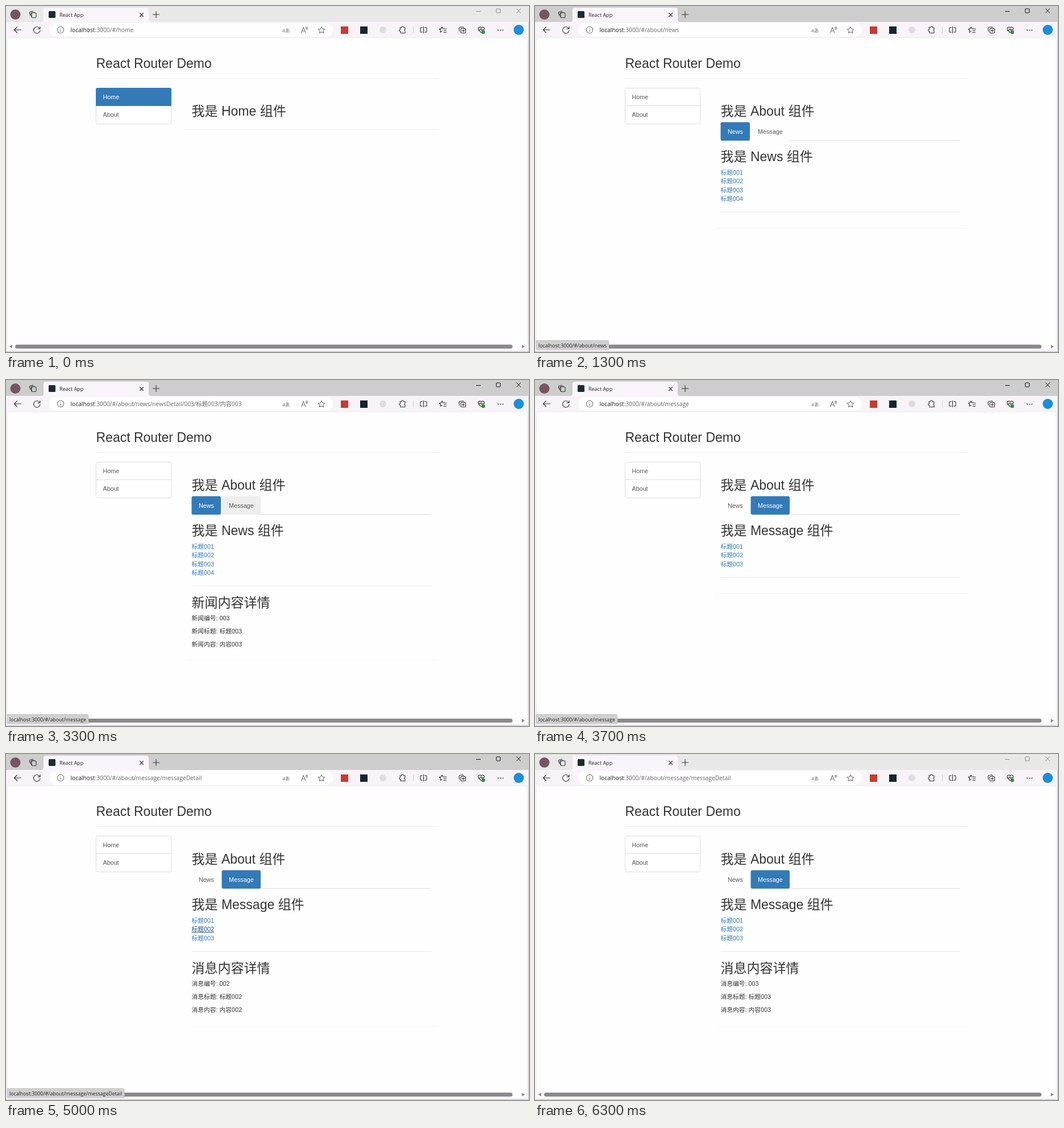
Animation of 920x609 px, one loop 6.4 s. Source, as an HTML page:

```html
<!DOCTYPE html>
<html lang="zh-CN">
<head>
<meta charset="utf-8">
<title>React App</title>
<style>
html, body { margin: 0; width: 100%; height: 100%; overflow: hidden; background: #f5f2f7; }
svg { display: block; font: 10.75px "Liberation Sans", "Noto Sans CJK SC", sans-serif; }
.ui { font-family: "Open Sans", "Noto Sans CJK SC", sans-serif; }
.line { fill: none; stroke: #333; stroke-width: 1.1; stroke-linecap: round; stroke-linejoin: round; }
.soft { stroke: #777; }
.hover { fill: #23527c; text-decoration: underline; }
</style>
</head>
<body>
<svg width="920" height="609" viewBox="0 0 920 609">
  <rect width="920" height="609" fill="#f7f3f9"/>
  <rect id="strip" width="920" height="28"/>
  <path d="M62 28q4 0 4-4V7q0-4 4-4h177q4 0 4 4v17q0 4 4 4z" fill="#f9f5fb"/>
  <circle cx="16.500" cy="15" r="9" fill="#765563"/>
  <rect x="75" y="9" width="12" height="12" rx="1.500" fill="#1c2b33"/>
  <text class="ui" x="94" y="18.500" font-size="9" fill="#222">React App</text>
  <rect x="76" y="30" width="499" height="24" rx="12" fill="#fff"/>
  <g class="line">
    <path d="M43 17l-1.500-4.500q-.5-1.500 1-2l5-1.500M45 19.500l-1-6q0-2 2-2l4-.5"/>
    <rect x="45" y="12" width="8" height="8.500" rx="1.500"/>
    <path d="M235.500 12.500l6 6m0-6l-6 6M258.500 15h11M264 9.500v11"/>
    <path d="M26.500 42h-12m5-5l-5 5 5 5"/>
    <path d="M59.500 40a5.700 5.700 0 1 0 .5 3M60 36.500v3.800h-4"/>
    <circle cx="697" cy="42" r="0"/>
    <path d="M693 38h2.500a2 2 0 0 1 4 0h2.500v3a1.700 1.700 0 0 0 0 3.200v3.300h-8v-3a1.800 1.800 0 1 1 0-3.500z"/>
    <path d="M732.500 38h-2.500q-1 0-1 1v6q0 1 1 1h2.500M736.500 38h2.500q1 0 1 1v6q0 1-1 1h-2.500M734.500 36.500v11"/>
    <path d="M767 37l1.500 3 3 .4M767 37l-1.500 3.100-3.200.4 2.400 2.300-.6 3.400 3-1.600M770 43.500h4.500M770 46.500h4.500M771 40.500h4"/>
    <path d="M797.500 44.500l-.5-5q0-1.500 1.500-2l5-.5q1.500 0 1.500 1"/>
    <rect x="800" y="39.500" width="8.500" height="8" rx="1.500"/>
    <path d="M804.300 41.500v4m-2-2h4"/>
    <path d="M836 47l-4.500-4.500q-2-3 .5-5 2.500-1.200 4 1 1.500-2.200 4-1 2.500 2 .7 4.500M831 42h3l1.500-2 1.500 3 1-1.500h3"/>
  </g>
  <g class="line soft">
    <circle cx="96" cy="42" r="5.700"/>
    <path d="M96 41.500v3.200M96 39.300v.1"/>
    <path d="M519.500 47l3.700-9.500 3.700 9.500m-6.100-3h4.800M527.500 37.500q1.500 1.500 0 3.500M529.300 36.500q2 2.500 0 5"/>
    <path d="M555 36.500l1.800 3.700 4 .6-2.900 2.800.7 4-3.600-1.900-3.600 1.900.7-4-2.900-2.800 4-.6z"/>
  </g>
  <text class="ui" x="486" y="46" font-size="8.500" fill="#666">aあ</text>
  <rect x="589" y="36" width="13" height="13" fill="#c8392f"/>
  <rect x="623" y="36" width="13" height="13" fill="#14252d"/>
  <circle cx="663" cy="42" r="6" fill="#dedce0"/>
  <path d="M716.500 36v12" stroke="#d3cfd6"/>
  <circle cx="839.500" cy="46" r="3.200" fill="#20952e"/>
  <g fill="#333"><circle cx="866" cy="42.500" r="1"/><circle cx="870" cy="42.500" r="1"/><circle cx="874" cy="42.500" r="1"/></g>
  <circle cx="902" cy="42" r="9" fill="#1b8fd9"/>
  <g id="controls" fill="none"><path d="M827 9.500h8M898 4.500l7.500 8m0-8l-7.500 8"/><rect x="862.500" y="5" width="7" height="7" rx="1"/></g>
  <rect x="2" y="56" width="915" height="550" rx="5" fill="#fefefe" stroke="#e9e5ec" stroke-width=".8"/>
  <path d="M919.500 28v581M0 608.500h920" stroke="#c4c1c7"/>
  <rect x="16" y="596" width="875" height="7" rx="3.500" fill="#8a8a8a"/>
  <path d="M11 596.300v6.400l-5-3.200zM907.500 596.300v6.400l5-3.200z" fill="#858585"/>
  <text x="158.500" y="108.500" font-size="23" fill="#333">React Router Demo</text>
  <path d="M159 127.500h601" stroke="#eee"/>
  <g id="view"></g>
  <g id="bubble"><path fill="#cfcfcf" stroke="#bdbdbd" stroke-width=".6"/><text class="ui" x="6" y="600.500" font-size="8.800" fill="#222"></text></g>
</svg>
<script>
const $ = q => document.querySelector(q);
const newsPath = n => `about/news/newsDetail/00${n}/标题00${n}/内容00${n}`;
const messagePath = 'about/message/messageDetail';

// Each step changes only the listed parts of the state.
const steps = [
  [0, {on: 0, page: 'home', url: 'home', hover: '', status: '', id: 0, fade: 1}],
  [700, {on: 1, page: 'about', url: 'about', status: 'about'}],
  [900, {hover: 'News', status: 'about/news'}],
  [1200, {page: 'news', url: 'about/news'}],
  [1600, {hover: '', status: ''}],
  [1700, {hover: '1', status: newsPath(1)}],
  [2000, {id: 1, url: newsPath(1), hover: '2', status: newsPath(2)}],
  [2300, {id: 2, url: newsPath(2)}],
  [2400, {hover: '23', status: newsPath(3)}],
  [2600, {id: 3, url: newsPath(3), hover: '3'}],
  [3000, {hover: ''}],
  [3200, {hover: 'Message', status: 'about/message'}],
  [3700, {page: 'message', url: 'about/message', id: 0}],
  [4100, {hover: '', status: ''}],
  [4200, {hover: '1', status: messagePath}],
  [4500, {id: 1, url: messagePath}],
  [4700, {hover: '12'}],
  [4800, {hover: '2'}],
  [5000, {id: 2}],
  [5100, {hover: '23'}],
  [5200, {hover: '3'}],
  [5400, {id: 3}],
  [5900, {fade: .4}],
  [6000, {status: ''}],
  [6300, {on: 0, hover: ''}]
];

const text = (x, y, str, fill = '#333', size = 10.75, cls = '') =>
  `<text x="${x}" y="${y}" fill="${fill}" font-size="${size}" class="${cls}">${str}</text>`;
const heading = (y, str) => text(326.5, y, str, '#333', 23);
const rule = (x1, x2, y, color) => `<path d="M${x1} ${y}H${x2}" stroke="${color}"/>`;
const box = (x, y, w, h, fill, r = 3) =>
  `<rect x="${x}" y="${y}" width="${w}" height="${h}" rx="${r}" fill="${fill}"/>`;
const outerRule = (y, color = '#f0f0f0') => rule(317, 760, y, color);

function sidebar(page) {
  const active = {home: 0, about: 1}[page];
  let out = '<rect x="158.500" y="144.500" width="132" height="63" rx="3" fill="#fff" stroke="#ddd"/>' +
    rule(159, 290, 175.5, '#ddd');
  if (active === 0) out += '<path d="M158 176v-29q0-3 3-3h127q3 0 3 3v29z" fill="#337ab7"/>';
  if (active === 1) out += '<path d="M158 176h133v29q0 3-3 3H161q-3 0-3-3z" fill="#337ab7"/>';
  ['Home', 'About'].forEach((name, i) =>
    out += text(170.5, 164 + i * 31.3, name, i === active ? '#fff' : '#555'));
  return out;
}

function tab(name, x, w, s) {
  const active = s.page === name.toLowerCase();
  const fill = active ? '#337ab7' : s.hover === name ? '#eee' : 'none';
  return box(x, 204.5, w, 32.5, fill) + text(x + 12.5, 224.5, name, active ? '#fff' : '#555');
}

function view(s) {
  let out = sidebar(s.page);
  if (s.page === 'home') return out + heading(192.7, '我是 Home 组件') + outerRule(217.5);

  out += heading(192.7, '我是 About 组件') + rule(447, 748, 236.5, '#ddd') +
    tab('News', 326.5, 51.5, s) + tab('Message', 379.5, 68.5, s);
  if (s.page === 'about') return out + outerRule(249.5);

  const news = s.page === 'news';
  const count = news ? 4 : 3;
  const end = news ? 362.5 : 347.5;
  out += heading(273.2, `我是 ${news ? 'News' : 'Message'} 组件`);
  for (let i = 1; i <= count; i++)
    out += text(326.5, 281.6 + i * 15.36, '标题00' + i, '#337ab7', 10.75, s.hover.includes(i) ? 'hover' : '');
  out += rule(326.5, 748, end, '#e8e8e8');
  if (!s.id) return out + outerRule(end + 28.5);

  const kind = news ? '新闻' : '消息';
  out += heading(end + 37.2, kind + '内容详情');
  [['编号', ''], ['标题', '标题'], ['内容', '内容']].forEach(([label, prefix], i) =>
    out += text(326.5, end + 60.5 + i * 23, `${kind}${label}: ${prefix}00${s.id}`));
  return out + outerRule(end + 130.5, '#fafafa');
}

function draw(s) {
  $('#strip').setAttribute('fill', s.on ? '#cdcdcd' : '#e8e8e8');
  $('#controls').setAttribute('stroke', s.on ? '#111' : '#8a8a8a');
  $('#view').innerHTML = view(s) +
    text(113.5, 46, `<tspan fill="#222">localhost</tspan>:3000/#/${s.url}`, '#666', 10.25, 'ui');

  const bubble = $('#bubble'), label = bubble.querySelector('text');
  bubble.setAttribute('opacity', s.status ? s.fade : 0);
  label.textContent = 'localhost:3000/#/' + s.status;
  const right = 10 + label.getComputedTextLength();
  bubble.querySelector('path').setAttribute('d', `M2 588.500H${right - 3}q3 0 3 3V605H2z`);
}

let shown = 0;
const start = performance.now();
function tick() {
  const time = (performance.now() - start) % 6400;
  const done = steps.filter(([at]) => at <= time);
  if (done.length !== shown) {
    shown = done.length;
    draw(Object.assign({}, ...done.map(step => step[1])));
  }
  requestAnimationFrame(tick);
}
tick();
</script>
</body>
</html>
```
